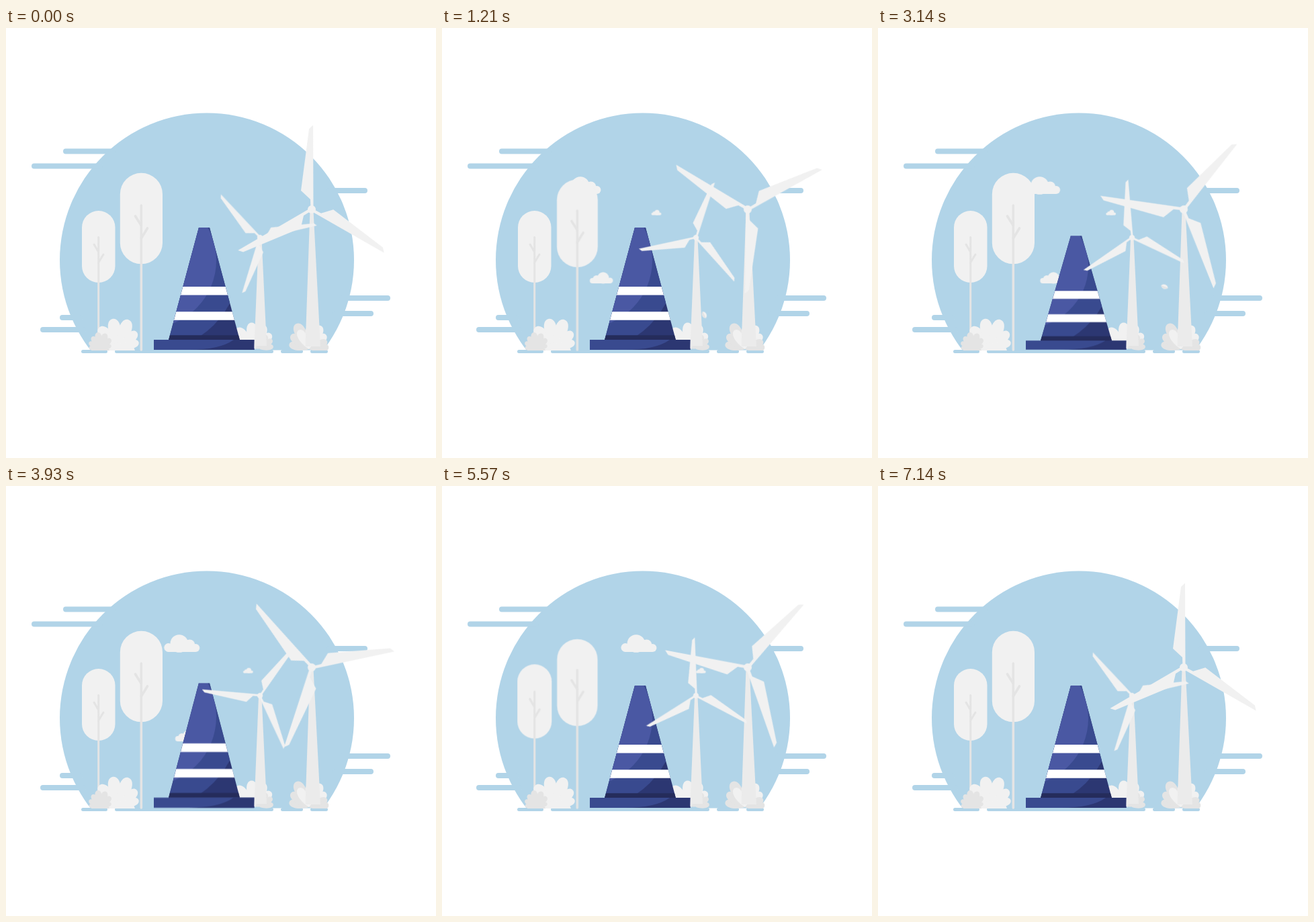
An HTML page without scripts for the animation above (7210 ms loop, 640x640 px).

```html
<!DOCTYPE html>
<html lang="en">
<head>
<meta charset="utf-8">
<title>Cone and wind turbines</title>
<style>
html, body { margin: 0; width: 100%; height: 100%; overflow: hidden; background: #fff; }
svg { display: block; width: 100%; height: 100%; }

:root { --loop: 7.21s; --ease: cubic-bezier(.33, 0, .67, 1); }
.sky { fill: #b1d4e8; }
.light { fill: #f1f1f1; }
.dark { fill: #e4e4e4; }
.line { fill: none; stroke: #b1d4e8; stroke-linecap: round; }
.wood { fill: none; stroke: #e4e4e4; stroke-linecap: round; }

.spin { animation: spin var(--loop) linear infinite; }
.cone { transform-origin: 295px 479px; animation: squash var(--loop) var(--ease) infinite; }
.tall { transform-origin: 201.3px 479px; animation: tall var(--loop) var(--ease) infinite; }
.short { transform-origin: 137.7px 479px; animation: short var(--loop) var(--ease) infinite; }
.cloud { animation: drift var(--loop) var(--ease) infinite, var(--fade) var(--loop) linear infinite; }
.leaf { opacity: 0; animation: var(--path) var(--loop) linear infinite; }

/* every cycle rests briefly at its end pose */
@keyframes spin { 99.03%, 100% { transform: rotate(360deg); } }
@keyframes drift { 99.03%, 100% { transform: translateX(var(--d)); } }

@keyframes squash {
  0%, 18.03% { transform: scaleY(1); }
  36.06% { transform: scaleY(.88); }
  54.09% { transform: scaleY(1.02); }
  74.9%, 100% { transform: scaleY(1); }
}
@keyframes tall {
  0%, 11.93%, 36.75%, 70.87%, 95.7%, 100% { transform: scale(1); }
  18.86%, 77.81% { transform: scale(.953); }
  27.05%, 85.99% { transform: scale(1.043); }
}
@keyframes short {
  0%, 58.95%, 83.77%, 100% { transform: scale(1); }
  65.88% { transform: scale(.95); }
  74.06% { transform: scale(1.043); }
}

@keyframes fade1 { 0%, 88.1%, 100% { opacity: 0; } 8%, 79.06% { opacity: 1; } }
@keyframes fade2 { 0%, 11.5%, 82%, 100% { opacity: 0; } 16%, 75% { opacity: 1; } }
@keyframes fade3 { 0%, 6%, 91.5%, 100% { opacity: 0; } 11%, 83.2% { opacity: 1; } }

@keyframes leafA {
  0%, 4% { transform: translate(372px, 455px) rotate(120deg); opacity: 0; }
  6% { opacity: 1; }
  16.78% { transform: translate(390.5px, 427px) rotate(65deg); }
  24% { transform: translate(378px, 402px) rotate(25deg); opacity: 1; }
  30.65% { transform: translate(354.5px, 380px) rotate(-15deg); opacity: .4; }
  34%, 100% { transform: translate(345px, 374px) rotate(-30deg); opacity: 0; }
}
@keyframes leafB {
  0%, 26.4% { transform: translate(430px, 456px) rotate(-80deg); opacity: 0; }
  28% { opacity: 1; }
  30.65% { transform: translate(424.5px, 447px) rotate(-55deg); }
  43.55% { transform: translate(426.5px, 385px) rotate(20deg); opacity: 1; }
  48%, 100% { transform: translate(420px, 370px) rotate(40deg); opacity: 0; }
}
@keyframes leafC {
  0%, 55.5% { transform: translate(430px, 450px) rotate(130deg); opacity: 0; }
  58% { opacity: 1; }
  66.44% { transform: translate(414px, 401.5px) rotate(82deg); opacity: 1; }
  75%, 100% { transform: translate(405px, 372px) rotate(40deg); opacity: 0; }
}
@keyframes leafD {
  0%, 24% { transform: translate(204px, 341px) rotate(-70deg); opacity: 0; }
  26% { opacity: 1; }
  30.65% { transform: translate(209.5px, 363.5px) rotate(-38deg); opacity: 1; }
  39%, 100% { transform: translate(216px, 390px) rotate(10deg); opacity: 0; }
}
@keyframes leafE {
  0%, 60% { transform: translate(134px, 376px) rotate(-20deg); opacity: 0; }
  62% { opacity: 1; }
  66.44% { transform: translate(137px, 413.5px) rotate(-58deg); opacity: 1; }
  74%, 100% { transform: translate(134px, 445px) rotate(-90deg); opacity: 0; }
}
</style>
</head>
<body>
<svg viewBox="0 0 640 640">
  <defs>
    <path id="blade" d="M-1.5 0L-2-15L-16-28L-4-120L2-125.5L2.5 0Z"/>
    <g id="rotor" class="light">
      <circle r="6"/>
      <use href="#blade"/>
      <use href="#blade" transform="rotate(120)"/>
      <use href="#blade" transform="rotate(240)"/>
    </g>
    <path id="petal" d="M0 0C-13-22-12-46 0-46S13-22 0 0"/>
    <g id="puff" class="light">
      <circle cx="6.5" cy="-6.5" r="6.5"/>
      <circle cx="22.5" cy="-12.5" r="13.3"/>
      <circle cx="38" cy="-10.5" r="8"/>
      <circle cx="47" cy="-6" r="6"/>
      <path d="M6.500 0V-10H41L47 0Z"/>
    </g>
    <g id="leaf">
      <path class="light" d="M-5.500 0C-3-4.500 3-4.500 5.500 0C3 4.500-3 4.500-5.500 0"/>
      <path class="dark" d="M-5.500 0H5.500C3 4-3 4-5.500 0"/>
    </g>
    <clipPath id="ground"><rect width="640" height="479.500"/></clipPath>
    <clipPath id="body"><path d="M287 297H303L348 464.500H242Z"/></clipPath>
    <clipPath id="foot"><path d="M220 464H369.500V479H220Z"/></clipPath>
  </defs>

  <circle class="sky" cx="299" cy="345.500" r="219" clip-path="url(#ground)"/>
  <path class="line" stroke-width="8" d="M89 183.500H160M42 205.500H140M480 242H534M500 402H568M490 425H543M84 431H110M55 449H115"/>
  <path class="line" stroke-width="5" d="M114.500 481.500H148.500M164.500 481.500H395.500M411.500 481.500H439.500M455.500 481.500H476.500"/>

  <g class="cloud" style="--d:104px;--fade:fade1"><use href="#puff" transform="translate(175.400 247)"/></g>
  <g class="cloud" style="--d:64px;--fade:fade2"><use href="#puff" transform="translate(249.500 380) scale(-.65 .65)"/></g>
  <g class="cloud" style="--d:83px;--fade:fade3"><use href="#puff" transform="translate(320 278.500) scale(-.28 .3)"/></g>

  <g class="leaf" style="--path:leafA"><use href="#leaf"/></g>
  <g class="leaf" style="--path:leafB"><use href="#leaf"/></g>
  <g class="leaf" style="--path:leafC"><use href="#leaf"/></g>
  <g class="leaf" style="--path:leafD"><use href="#leaf"/></g>

  <!-- trees -->
  <g class="short">
    <rect class="light" x="113" y="272" width="49.500" height="107" rx="24.750"/>
    <path class="wood" stroke-width="3" d="M137.700 311.500V478M131 322L137.700 333.500M145 337L137.700 349"/>
  </g>
  <g class="leaf" style="--path:leafE"><use href="#leaf"/></g>
  <g class="tall">
    <rect class="light" x="169.800" y="215.800" width="63.200" height="135.500" rx="31.600"/>
    <path class="wood" stroke-width="3.600" stroke-linecap="butt" d="M201.300 264V479"/>
    <path class="wood" stroke-width="3.600" d="M192.500 280L201.300 294M210.500 298L201.300 313"/>
  </g>

  <!-- bushes -->
  <g clip-path="url(#ground)">
    <g class="light" transform="translate(168 478)">
      <use href="#petal" transform="rotate(-42) scale(.95)"/>
      <use href="#petal" transform="rotate(-12)"/>
      <use href="#petal" transform="rotate(18)"/>
      <use href="#petal" transform="rotate(46) scale(.8)"/>
      <use href="#petal" transform="rotate(70) scale(.68)"/>
      <path d="M-30 2V-8H20L24 2Z"/>
    </g>
    <g class="dark" transform="translate(140 478)">
      <use href="#petal" transform="rotate(-82) scale(.36)"/>
      <use href="#petal" transform="rotate(-58) scale(.42)"/>
      <use href="#petal" transform="rotate(-32) scale(.48)"/>
      <use href="#petal" transform="rotate(-8) scale(.55)"/>
      <use href="#petal" transform="rotate(20) scale(.54)"/>
      <use href="#petal" transform="rotate(46) scale(.48)"/>
      <use href="#petal" transform="rotate(72) scale(.38)"/>
      <path d="M-13 2L-10-9H10L14 2Z"/>
    </g>
    <g transform="translate(368 478)">
      <g class="light">
        <use href="#petal" transform="rotate(-38) scale(.86)"/>
        <use href="#petal" transform="rotate(-4) scale(.86)"/>
        <use href="#petal" transform="rotate(25) scale(.86)"/>
        <use href="#petal" transform="rotate(50) scale(.76)"/>
      </g>
      <g class="dark" transform="translate(10 0)">
        <use href="#petal" transform="rotate(25) scale(.5)"/>
        <use href="#petal" transform="rotate(52) scale(.5)"/>
        <use href="#petal" transform="rotate(78) scale(.44)"/>
      </g>
    </g>
    <g transform="translate(451 478)">
      <g class="dark">
        <use href="#petal" transform="rotate(-76) scale(.66)"/>
        <use href="#petal" transform="rotate(-52) scale(.74)"/>
        <use href="#petal" transform="rotate(-27) scale(.92)"/>
      </g>
      <g class="light">
        <use href="#petal" transform="rotate(-28) scale(.7)"/>
        <use href="#petal" transform="rotate(5) scale(.8)"/>
        <use href="#petal" transform="rotate(27) scale(.85)"/>
        <use href="#petal" transform="rotate(50) scale(.72)"/>
      </g>
      <g class="dark">
        <use href="#petal" transform="rotate(66) scale(.64)"/>
        <use href="#petal" transform="rotate(84) scale(.64)"/>
      </g>
    </g>
  </g>

  <g class="cone">
    <g clip-path="url(#body)">
      <path fill="#2c3772" d="M240 295H350V466H240Z"/>
      <circle fill="#394a8f" cx="213" cy="346" r="136"/>
      <circle fill="#4a58a3" cx="213" cy="346" r="100"/>
      <path fill="#fff" d="M240 385H350V397.500H240ZM240 422.300H350V434.800H240Z"/>
      <path fill="#252c5b" d="M240 457.300H350V465H240Z"/>
    </g>
    <g clip-path="url(#foot)">
      <path fill="#394a8f" d="M220 464H370V479H220Z"/>
      <path fill="#2c3772" d="M339 464Q318 479 272 479H370V464Z"/>
    </g>
  </g>

  <!-- turbines -->
  <g fill="#ebebeb">
    <path d="M376 314H380.500L388 473V477H369.500V473Z"/>
    <path d="M452.500 272H457.500L468 474H445.500Z"/>
  </g>
  <path class="dark" d="M373 473H388V477.500H371Z"/>
  <g transform="translate(378 312) rotate(-43) scale(.69)"><use class="spin" href="#rotor"/></g>
  <g transform="translate(455 270)"><use class="spin" href="#rotor"/></g>
</svg>
</body>
</html>
```
